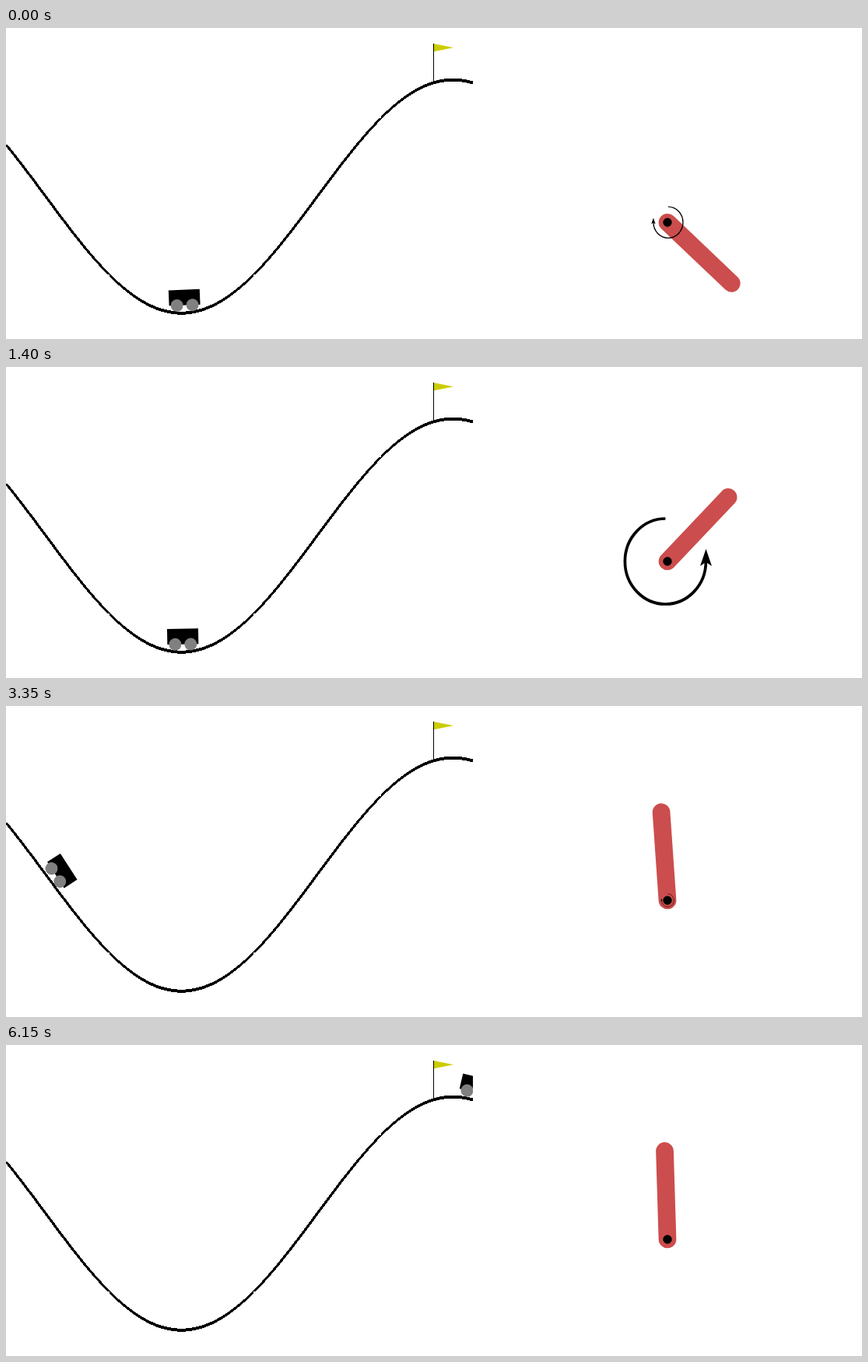
Animation of 1100 by 400 pixels, one loop 6.8 s. Source, as an HTML page with a canvas:

```html
<!DOCTYPE html>
<html lang="en">
<head>
<meta charset="utf-8">
<title>Mountain car and pendulum</title>
<style>
  html, body { margin: 0; width: 100%; height: 100%; overflow: hidden; background: #fff; }
  canvas { display: block; }
</style>
</head>
<body>
<canvas id="stage" width="1100" height="400"></canvas>
<script>
const ctx = document.getElementById('stage').getContext('2d');
const LOOP = 6800, TICK = 50;
const RAD = Math.PI / 180;

const clamp = (v, lo, hi) => Math.max(lo, Math.min(hi, v));

// Turning points as [tick, value]; the motion swings like a cosine between them.
const CAR_TURNS = [[0, 230], [20, 188.7], [47, 381.5], [71.7, 24.5]];
const ROD_TURNS = [[0, -46.4], [10.6, 110], [27.55, -137], [46, 149.2]];
const WALL = { tick: 93.5, x: 600 };
const REST = 178.24;

function swing(turns, t) {
  const i = turns.findIndex(turn => turn[0] > t);
  const [t0, a] = turns[i - 1], [t1, b] = turns[i];
  return a + (b - a) * (1 - Math.cos(Math.PI * (t - t0) / (t1 - t0))) / 2;
}

// Car centre in px: swings, then one long run up to the wall.
function carX(t) {
  const [start, low] = CAR_TURNS[CAR_TURNS.length - 1];
  if (t < start) return swing(CAR_TURNS, t);
  const s = Math.min(1, (t - start) / (WALL.tick - start));
  return low + (WALL.x - low) * s ** 1.776;
}

// Rod in degrees clockwise from hanging: swings, then settles near upright.
function rodAngle(t) {
  const [start, high] = ROD_TURNS[ROD_TURNS.length - 1];
  if (t < start) return swing(ROD_TURNS, t);
  return REST - (REST - high) / Math.cosh((t - start) / 6.45);
}

// Clockwise torque: builds up, pushes away from the bottom, then balances.
function torque(t) {
  const angle = rodAngle(t);
  if (t < ROD_TURNS[1][0]) return Math.min(2, 0.73 + 0.42 * t);
  if (t < ROD_TURNS[3][0]) return clamp(1.59 * (angle - 10.67), -2, 2);
  return Math.min(2, 0.154 + 0.068 * (REST - angle));
}

// Hill: world x runs from -1.2 to 0.6 over 600 px.
const SCALE = 600 / 1.8;
const worldX = px => px / SCALE - 1.2;
const hillY = px => 400 - (Math.sin(3 * worldX(px)) * 0.45 + 0.55) * SCALE;
const slope = px => Math.cos(3 * worldX(px));

// Hard-edged line: 4 px across its minor axis, one span per pixel centre crossed.
function buildTrack() {
  const path = new Path2D(), step = 1 / 16;
  const crosses = (a, b) => Math.round(a) !== Math.round(b);
  for (let x = step; x <= 600; x += step) {
    const y = hillY(x), last = hillY(x - step);
    if (Math.abs(1.35 * slope(x)) > 1) {
      if (crosses(y, last)) path.rect(Math.round(x - 2), Math.floor(Math.max(y, last)), 4, 1);
    } else if (crosses(x, x - step)) {
      path.rect(Math.floor(x), Math.round(y - 2), 1, 4);
    }
  }
  return path;
}
const track = buildTrack();

function disc(x, y, r, color) {
  ctx.fillStyle = color;
  ctx.beginPath();
  ctx.arc(x, y, r, 0, 2 * Math.PI);
  ctx.fill();
}

function polygon(points) {
  ctx.beginPath();
  points.forEach(([x, y]) => ctx.lineTo(x, y));
  ctx.fill();
}

function drawHill(t) {
  ctx.save();
  ctx.beginPath();
  ctx.rect(0, 0, 600, 400);
  ctx.clip();
  ctx.fillStyle = '#000';
  ctx.fill(track);

  const x = carX(t);
  ctx.save();
  ctx.translate(x, hillY(x));
  ctx.rotate(-slope(x));
  ctx.fillRect(-20, -30, 40, 20);
  disc(-10, -10, 8, '#808080');
  disc(10, -10, 8, '#808080');
  ctx.restore();

  ctx.fillStyle = '#000';
  ctx.fillRect(549, 20, 1, 50);
  ctx.fillStyle = '#cccc00';
  polygon([[550, 20.3], [550, 30.3], [575, 25.3]]);
  ctx.restore();
}

function drawTorque(w) {
  const k = Math.abs(w) / 2;
  if (k < 0.01) return;
  ctx.save();
  ctx.scale(Math.sign(w) * k, k);
  ctx.strokeStyle = ctx.fillStyle = '#000';
  ctx.lineWidth = 3.7;
  ctx.beginPath();
  ctx.ellipse(2.6, 0, 52, 55, 0, -Math.PI / 2, Math.PI);
  ctx.stroke();
  polygon([[-49.5, -16], [-57, 6], [-49.5, 1], [-42, 6]]);
  ctx.restore();
}

function drawPendulum(t) {
  const unit = 500 / 4.4;
  ctx.save();
  ctx.translate(850, 250);
  ctx.save();
  ctx.rotate(rodAngle(t) * RAD);
  ctx.strokeStyle = '#cc4d4d';
  ctx.lineWidth = 0.2 * unit;
  ctx.lineCap = 'round';
  ctx.beginPath();
  ctx.moveTo(0, 0);
  ctx.lineTo(0, unit);
  ctx.stroke();
  ctx.restore();
  disc(0, 0, 0.05 * unit, '#000');
  drawTorque(torque(t));
  ctx.restore();
}

function draw(now) {
  const t = Math.floor((now % LOOP) / TICK);
  ctx.fillStyle = '#fff';
  ctx.fillRect(0, 0, 1100, 400);
  drawHill(t);
  drawPendulum(t);
  requestAnimationFrame(draw);
}

draw(0);
</script>
</body>
</html>
```
